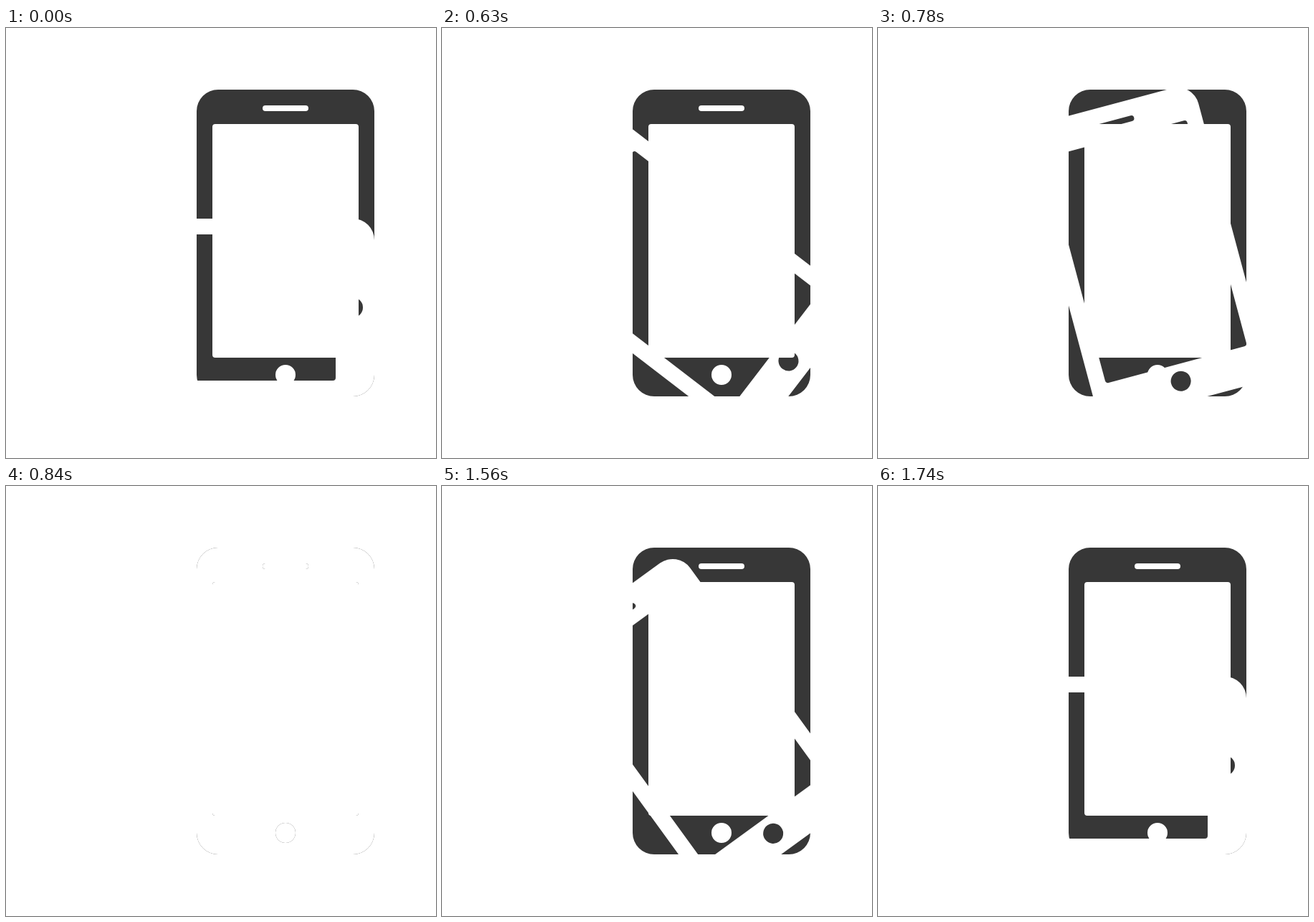
Recreate the animation shown at these times as an HTML page with a canvas. Size 600x600 px, loop 2390 ms.

```html
<!DOCTYPE html>
<html lang="en">
<head>
<meta charset="utf-8">
<title>Phone rotation</title>
<style>
  html, body { margin: 0; width: 100%; height: 100%; overflow: hidden; background: #fff; }
  canvas { display: block; }
</style>
</head>
<body>
<canvas id="stage" width="600" height="600"></canvas>
<script>
const ctx = document.getElementById('stage').getContext('2d');
const LOOP = 2390;
const STEP = 30;
const SHIFT = 90;
const DARK = '#373737';
const LIGHT = '#fff';

// Phone outline with cut-out screen, speaker and button, centred on the origin.
const phone = new Path2D();
phone.roundRect(-124, -214, 248, 428, 30);
phone.roundRect(-102, -166, 204, 326, 4);
phone.roundRect(-32, -192, 64, 8, 4);
phone.moveTo(14, 184);
phone.arc(0, 184, 14, 0, Math.PI * 2);

function drawPhone(x, y, degrees, color) {
  ctx.save();
  ctx.translate(x, y);
  ctx.rotate(degrees * Math.PI / 180);
  ctx.fillStyle = color;
  ctx.fill(phone, 'evenodd');
  ctx.restore();
}

// Stepped linear progress from 0 to 1, first step at `start`.
function ramp(t, start, steps) {
  const done = Math.floor((t - start) / STEP) + 1;
  return Math.min(Math.max(done, 0), steps) / steps;
}

function render(t) {
  const turn = 1 - ramp(t, 510, 12) + ramp(t, 1470, 10);
  ctx.fillStyle = LIGHT;
  ctx.fillRect(0, 0, 600, 600);
  drawPhone(390, 300, 0, DARK);
  drawPhone(390 - SHIFT * turn, 300 + SHIFT * turn, -90 * turn, LIGHT);
}

function tick(now) {
  render(now % LOOP);
  requestAnimationFrame(tick);
}

render(0);
requestAnimationFrame(tick);
</script>
</body>
</html>
```
